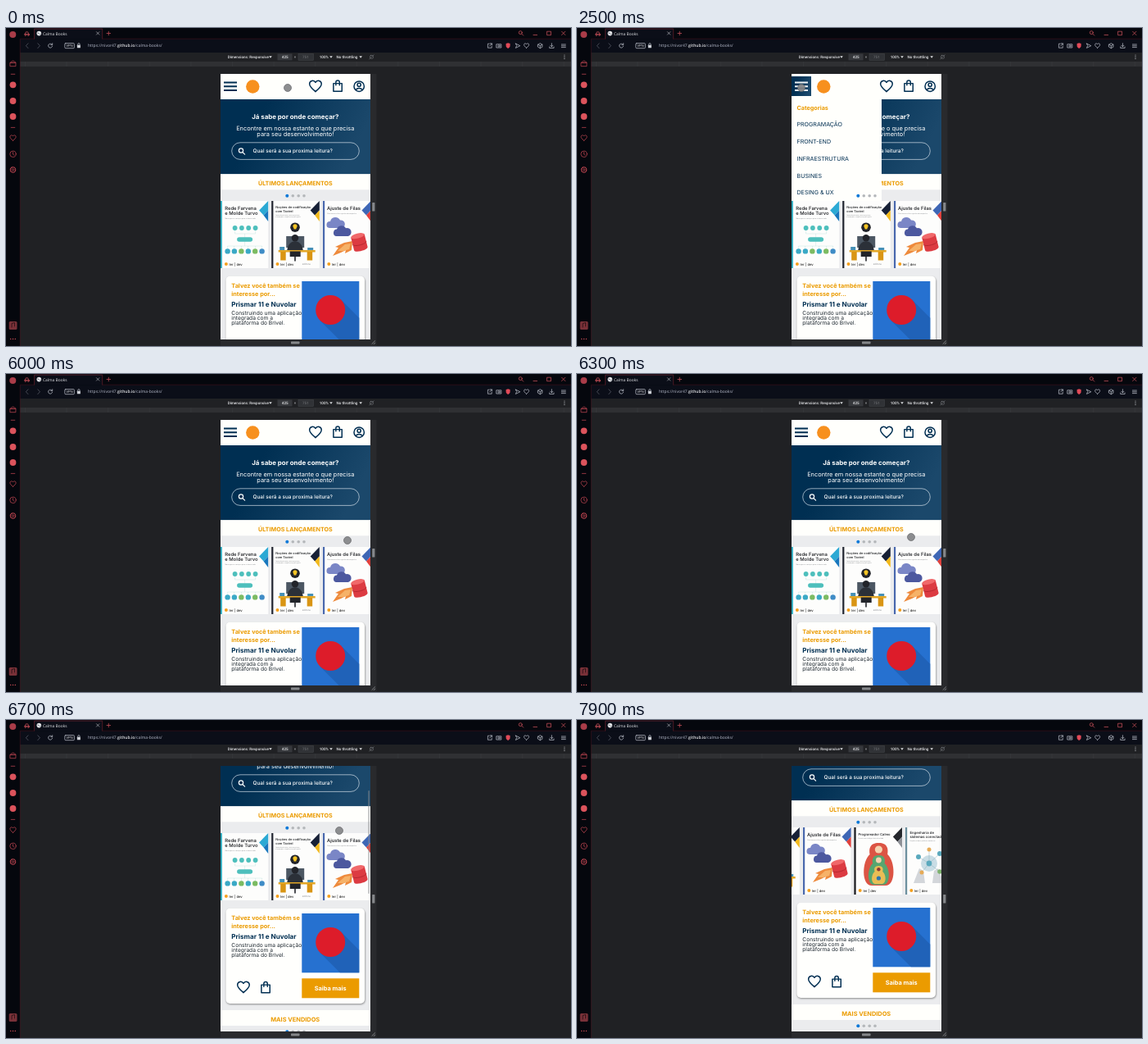
Recreate the animation shown at these times as an HTML page. Size 690 by 388 pixels, loop 8 s.

```html
<!DOCTYPE html>
<html lang="pt">
<head>
<meta charset="utf-8">
<title>Calma Books</title>
<style>
html, body { margin: 0; width: 100%; height: 100%; overflow: hidden; background: #202124; }
svg.stage { display: block; width: 100vw; height: 100vh; text-rendering: geometricPrecision; }
text { font-family: Inter, "Open Sans", sans-serif; white-space: pre; }
.ui text { font-family: "Open Sans", "Noto Sans", sans-serif; fill: #e4e5e8; }
.tools text { font: 500 4.6px Roboto, sans-serif; }
.line { fill: none; stroke: currentColor; stroke-linecap: round; stroke-linejoin: round; }
.mid { text-anchor: middle; }
.bold { font-weight: 700; }
.navy { fill: #002f52; }
.gold { fill: #eb9b00; }
.cover text { fill: #16181c; font-weight: 500; }
.cover .sub { fill: #8b8e92; font-size: 1.9px; font-weight: 400; }

.cursor, .scroll, .menu, .shelf, .bar { animation: 8s infinite step-end; }
.cursor { animation-name: cursor; }
.scroll { animation-name: scroll; }
.menu { animation-name: menu; }
.shelf { animation-name: shelf; }
.bar { animation-name: bar; }

@keyframes cursor {
  0% { transform: translate(344px, 73px); opacity: 1; }
  15% { transform: translate(344px, 73px); animation-timing-function: steps(6); }
  22.5% { transform: translate(274px, 73px); }
  57.5% { transform: translate(274px, 73px); animation-timing-function: steps(8); }
  67.5% { transform: translate(386px, 218px); animation-timing-function: steps(6); }
  75% { transform: translate(417px, 203px); animation-timing-function: steps(3); }
  78.75% { transform: translate(408px, 199px); }
  80% { transform: translate(407px, 177px); }
  81.25% { transform: translate(407px, 151px); }
  82.5% { transform: translate(407px, 135px); opacity: 1; }
  85%, 100% { transform: translate(407px, 135px); opacity: 0; }
}
@keyframes scroll {
  0%, 78.75% { transform: translateY(0); }
  80% { transform: translateY(-22px); }
  81.25% { transform: translateY(-48px); }
  82.5% { transform: translateY(-64px); }
  83.75% { transform: translateY(-73px); }
  85% { transform: translateY(-78px); }
  86.25%, 100% { transform: translateY(-80px); }
}
@keyframes bar {
  0% { opacity: 0; transform: translateY(0); }
  80% { opacity: .55; transform: translateY(9px); }
  81.25% { opacity: .55; transform: translateY(19px); }
  82.5% { opacity: .55; transform: translateY(26px); }
  83.75% { opacity: .55; transform: translateY(29px); }
  85% { opacity: .55; transform: translateY(32px); }
  92.5%, 100% { opacity: 0; transform: translateY(32px); }
}
@keyframes menu {
  0% { opacity: 0; }
  30% { opacity: 1; }
  57.5%, 100% { opacity: 0; }
}
@keyframes shelf {
  0%, 91.25% { transform: translateX(0); animation-timing-function: steps(2); }
  93.75% { transform: translateX(-28px); animation-timing-function: steps(2); }
  96.25% { transform: translateX(-83px); animation-timing-function: steps(2); }
  98.75%, 100% { transform: translateX(-111px); }
}
</style>
</head>
<body>
<svg class="stage" viewBox="0 0 690 388" xmlns="http://www.w3.org/2000/svg">
<defs>
  <linearGradient id="sea" x1="0" y1="0" x2="1" y2=".25">
    <stop offset=".3" stop-color="#002f52"/><stop offset="1" stop-color="#1b486b"/>
  </linearGradient>
  <clipPath id="screen"><rect x="262" y="56" width="183" height="324"/></clipPath>
  <filter id="soft" x="-10%" y="-10%" width="120%" height="120%"><feGaussianBlur stdDeviation="1.2"/></filter>
  <pattern id="ticks" width="50.6" height="6" patternUnits="userSpaceOnUse" x="17" y="41">
    <rect width="50.6" height="6" fill="#2f3033"/><path d="M6.5 0V6" stroke="#37393c" stroke-width=".6"/>
  </pattern>
  <path id="heart" d="M12 21C5 15 2 12 2 8a5.3 5.3 0 0 1 10-2.3A5.3 5.3 0 0 1 22 8c0 4-3 7-10 13z"/>
  <path id="bag" d="M5 8h14v13H5zM9 11V6a3 3 0 0 1 6 0v5"/>
  <g id="dots">
    <circle cx="343.3" r="2" fill="#0878d8"/>
    <g fill="#b4b7ba"><circle cx="350.3" r="1.8"/><circle cx="357.2" r="1.8"/><circle cx="364" r="1.8"/></g>
  </g>
  <g id="cover">
    <rect width="58.6" height="82" fill="#fdfdfc"/>
    <rect width="2.2" height="82" style="fill:var(--s)"/>
    <path d="M58.6 0L47.5 11.5L53 17.5L58.6 11.5z" style="fill:var(--a)"/>
    <path d="M58.6 11.5L53 17.5L58.6 25z" style="fill:var(--b)"/>
    <circle cx="7.3" cy="77" r="2" fill="#f5a01d"/>
    <text x="11" y="78.6" style="font-size:4.2px">ler | dev</text>
  </g>
</defs>

<rect width="690" height="388" fill="#202124"/>

<g class="ui">
  <rect width="690" height="14" fill="#05070d"/>
  <rect y="13" width="17" height="375" fill="#05070d"/>
  <rect x="17" y="13.5" width="673" height="16.5" fill="#0b0e18"/>
  <rect x="17" y="30" width="673" height="11" fill="#202124"/>
  <rect x="17" y="41" width="673" height="6" fill="url(#ticks)"/>
  <path d="M17.3 388V13.2H34.3M118 13.2H690" fill="none" stroke="#43141f" stroke-width=".6"/>
  <path d="M34.6 13.6V1.1H117.7V13.6" fill="#0b0e18" stroke="#7a2632" stroke-width=".6"/>

  <!-- side bar -->
  <g fill="#db535c">
    <circle cx="8.3" cy="8" r="4" fill="#a93c48"/>
    <circle cx="8.5" cy="69.3" r="3.9"/><circle cx="8.5" cy="89" r="3.9"/><circle cx="8.5" cy="108" r="3.9"/>
    <circle cx="5.7" cy="379.4" r=".7"/><circle cx="8.5" cy="379.4" r=".7"/><circle cx="11.3" cy="379.4" r=".7"/>
    <rect x="3.7" y="358" width="9.8" height="10" rx="1.5" fill="#793138"/>
  </g>
  <g class="line" color="#bd4550" stroke-width=".75">
    <path d="M5.3 42.5h6.6v4.2H5.3zM5.3 42.5l1-1.6M11.9 42.5l-1-1.6M7.2 42.5c0-3.6 2.8-3.6 2.8 0M6.2 56.3h4.6M6.2 121.4h4.6"/>
    <use href="#heart" transform="translate(4.2 129.8) scale(.36)" stroke-width="2.1"/>
    <circle cx="8.5" cy="153.8" r="3.7"/><path d="M8.5 151.7v2.4l1.5 1"/>
    <circle cx="8.5" cy="173" r="1.3"/><circle cx="8.5" cy="173" r="3.2" stroke-width="1.1" stroke-dasharray="1.5 1"/>
    <path d="M7 365v-4.5l3.5-1v4.4" stroke="#1c0c10"/>
  </g>

  <!-- tab strip -->
  <g class="line" color="#c9505a" stroke-width=".75">
    <path d="M22.5 7.5h6M23.3 7.5l.9-2.6h2.6l.9 2.6"/><circle cx="23.7" cy="8.6" r=".9"/><circle cx="27.3" cy="8.6" r=".9"/>
    <path d="M123 6.5h4.6M125.3 4.2v4.6"/>
    <circle cx="628.3" cy="5.6" r="2"/><path d="M629.8 7.1l2 2M644 8.5h4.6M661 4.2h4.5v4.5H661zM678.6 4.2l4.4 4.4M683 4.2l-4.4 4.4"/>
  </g>
  <circle cx="40.3" cy="6.6" r="2.8" fill="#e6e8eb"/>
  <path d="M38.4 5.4l1.7.5-.6 1.3zM41 7l1.2-.4-.6 1.7z" fill="#30343d"/>
  <text x="45" y="8.5" font-size="4.9">Calma Books</text>
  <path class="line" color="#c9ccd1" stroke-width=".6" d="M110.5 4.7l3.4 3.4M113.9 4.7l-3.4 3.4"/>

  <!-- address row -->
  <g class="line" color="#c3c7d2" stroke-width=".7">
    <path d="M27 18.8l-2.6 2.9 2.6 2.9M38.8 18.8l2.6 2.9-2.6 2.9" opacity=".45"/>
    <path d="M56.2 20.2a2.5 2.5 0 1 0 .4 2M56.7 18.7v1.9h-1.9"/>
    <rect x="71.8" y="18.6" width="11.6" height="6.1" rx="1"/>
    <path d="M87.7 20.8v-1a1.2 1.2 0 0 1 2.4 0v1"/>
    <path d="M590.2 19.2h-1.8v5h4.8v-1.8M590.6 22l2.7-3M591.3 18.9h2.1V21M599.2 19.8h5.6v4.2h-5.6z"/><circle cx="602" cy="21.9" r="1.2"/>
    <path d="M622.4 19l5.4 2.7-5.4 2.7 1.2-2.7zM649.7 20.2l2.6-1.5 2.6 1.5v3l-2.6 1.5-2.6-1.5zl2.6 1.5 2.6-1.5M652.3 21.7v3"/>
    <use href="#heart" transform="translate(632 18) scale(.3)" stroke-width="2.3"/>
    <path d="M666.4 18.7v4M664.8 21.2l1.6 1.6 1.6-1.6M663.7 23v1.4h5.4V23M678.4 20h5M678.4 21.8h5M678.4 23.6h5"/>
  </g>
  <path d="M610.6 19l2.5-.8 2.5.8v2.6c0 1.8-1 2.7-2.5 3.4-1.5-.7-2.5-1.6-2.5-3.4z" fill="#e24a58"/>
  <rect x="86.9" y="20.7" width="4" height="3.5" rx=".5" fill="#cfd2d8"/>
  <text class="mid" x="77.6" y="23.3" font-size="4.3">VPN</text>
  <text x="100" y="23.4" font-size="5"><tspan fill="#b9bece">https://nivor47.</tspan><tspan font-weight="600">github.io</tspan><tspan fill="#b9bece">/calma-books/</tspan></text>

  <!-- device tools -->
  <g class="tools">
    <text x="270.7" y="37">Dimensions: Responsive</text>
    <path d="M321.2 34.3h3.6l-1.8 2.4zM395.2 34.3h3.6l-1.8 2.4zM431.4 34.3h3.6l-1.8 2.4z" fill="#d8dadd"/>
    <rect x="331.5" y="31.4" width="18" height="8" fill="#36383c"/>
    <rect x="357" y="31.4" width="18.5" height="8" fill="#303236" stroke="#45484d" stroke-width=".5"/>
    <text x="336.8" y="37">425</text>
    <text x="351.8" y="37" opacity=".7">×</text>
    <text x="362" y="37" opacity=".3">751</text>
    <text x="382.7" y="37">100%</text>
    <text x="403.5" y="37">No throttling</text>
    <g class="line" color="#777b80" stroke-width=".6"><rect x="444.6" y="33.4" width="3.8" height="3.8" rx="1"/><path d="M443.8 37.8l5.4-5"/></g>
    <g fill="#b5b8bc"><circle cx="682" cy="33" r=".6"/><circle cx="682" cy="35.2" r=".6"/><circle cx="682" cy="37.4" r=".6"/></g>
  </g>
  <path d="M445 56h7.5v331.5H262V380H445z" fill="#292a2d"/>
  <rect x="447.2" y="213" width="3.2" height="10.5" rx=".6" fill="#85878a"/>
  <rect x="348" y="382.6" width="10.5" height="2.8" rx=".6" fill="#85878a"/>
  <path d="M446.7 385.7l4.2-4.2M449 385.9l2-2" stroke="#96989b" stroke-width=".8"/>
</g>

<g clip-path="url(#screen)">
 <g class="scroll">
  <rect x="262" y="56" width="183" height="440" fill="#ebecee"/>

  <!-- header -->
  <rect x="262" y="56" width="183" height="31" fill="#fffffc"/>
  <path d="M266 66.6h16M266 71.3h16M266 76h16" stroke="#002f52" stroke-width="2"/>
  <circle cx="301.3" cy="71.5" r="8.2" fill="#f7901e"/>
  <g class="line" color="#002f52" stroke-width="2">
    <use href="#heart" transform="translate(369.2 62.3) scale(.73)"/>
    <use href="#bag" transform="translate(396.2 61.7) scale(.74)"/>
    <g stroke-width="1.5"><circle cx="431.2" cy="71.2" r="6.2"/><circle cx="431.2" cy="69.3" r="2.1"/><path d="M427.2 75.6c1.6-2.8 6.4-2.8 8 0"/></g>
  </g>

  <!-- banner -->
  <rect x="262" y="87" width="183" height="91.3" fill="url(#sea)"/>
  <g fill="#fff" class="mid">
    <text class="bold" x="353.3" y="110.8" font-size="7.9">Já sabe por onde começar?</text>
    <text x="353.3" y="124.8" font-size="7.4">Encontre em nossa estante o que precisa</text>
    <text x="353.3" y="131.9" font-size="7.4">para seu desenvolvimento!</text>
  </g>
  <rect x="275.7" y="139.8" width="155.6" height="20.6" rx="10.3" fill="none" stroke="#d3dfe8" stroke-width=".7"/>
  <g class="line" color="#fff" stroke-width="1.2"><circle cx="287" cy="149.5" r="2.6"/><path d="M289 151.6l2.6 2.6"/></g>
  <text x="301.5" y="152.4" font-size="6.4" font-weight="500" fill="#fff">Qual será a sua proxima leitura?</text>

  <!-- new titles -->
  <rect x="262" y="178.3" width="183" height="19" fill="#fffffc"/>
  <text class="mid gold bold" x="353.4" y="192.2" font-size="7.2">ÚLTIMOS LANÇAMENTOS</text>

  <g class="menu">
    <rect x="262" y="87" width="110" height="124.5" fill="#fffffc"/>
    <rect x="262" y="59" width="24" height="24" fill="url(#sea)"/>
    <path d="M266 66.6h16M266 71.3h16M266 76h16" stroke="#eef1f3" stroke-width="2"/>
    <text class="gold bold" x="268.5" y="99.6" font-size="7.2">Categorias</text>
    <g class="navy" font-size="7.1">
      <text x="268.5" y="120.4">PROGRAMAÇÃO</text>
      <text x="268.5" y="141.1">FRONT-END</text>
      <text x="268.5" y="161.8">INFRAESTRUTURA</text>
      <text x="268.5" y="182.5">BUSINES</text>
      <text x="268.5" y="203.3">DESING &amp; UX</text>
    </g>
  </g>

  <use href="#dots" y="204.8"/>
  <g class="shelf cover">
    <g transform="translate(261.6 211)">
      <use href="#cover" style="--s:#25a9bd;--a:#2ba9d4;--b:#1877bd"/>
      <text x="5.6" y="10.5" font-size="5.9">Rede Farvena</text>
      <text x="5.6" y="17" font-size="5.9">e Molde Turvo</text>
      <text class="sub" x="5.8" y="21.6">Mensagens e serviços para sistemas web</text>
      <path d="M18 33v7h25v-7M30 40v15M9 61v-6h42v6M17 61v-6M26 61v-6M34 61v-6M43 61v-6" fill="none" stroke="#b5dddb" stroke-width=".4"/>
      <g fill="#4dbfbc"><circle cx="18" cy="33" r="2.9"/><circle cx="26.3" cy="33" r="2.9"/><circle cx="34.6" cy="33" r="2.9"/><circle cx="43" cy="33" r="2.9"/><rect x="20.5" y="44.2" width="19" height="5.6" rx="2.8"/></g>
      <g fill="#3aa9c6"><circle cx="9" cy="61.4" r="3.2"/><circle cx="17.3" cy="61.4" r="3.2"/><circle cx="34.2" cy="61.4" r="3.2"/></g>
      <g fill="#7bbb62"><circle cx="25.8" cy="61.4" r="3.2"/><circle cx="42.6" cy="61.4" r="3.2"/></g>
      <circle cx="51" cy="61.4" r="3.2" fill="#3f8cc6"/>
    </g>
    <g transform="translate(324.2 211)">
      <use href="#cover" style="--s:#20242f;--a:#172036;--b:#f2b91c"/>
      <text x="5" y="9.2" font-size="3.9">Noções de codificação</text>
      <text x="5" y="13.6" font-size="3.9">com Tavirel</text>
      <text class="sub" x="5" y="18">Aprenda do zero, com exercícios</text>
      <text class="sub" x="5" y="20.4">e exemplos simples em português</text>
      <circle cx="28.8" cy="32.2" r="5.8" fill="#22242a"/>
      <path d="M26.2 30.8a2.6 2.6 0 1 1 5.2 0c0 1.6-1.2 2-1.2 3.6h-2.8c0-1.6-1.2-2-1.2-3.6z" fill="#f5c525"/>
      <path d="M18 43h22v14H18z" fill="#4c5763"/>
      <circle cx="28.8" cy="45.2" r="4.2" fill="#22242a"/>
      <path d="M19 62c0-17 19.6-17 19.6 0z" fill="#2b3038"/>
      <path d="M8.5 60h45v2.4H8.5z" fill="#e3a727"/>
      <path d="M11 62h6.5v10.5H11zM43.5 62H50v10.5h-6.5z" fill="#d99514"/>
      <path d="M22.5 61.5h13v6.5h-13zM28 68h1.6v5.5H28z" fill="#22242a"/>
      <path d="M10 56h6v4h-6zM44 57h7v3h-7z" fill="#4690b6"/>
      <text class="sub" x="37.5" y="78.3" style="font-size:3px">editora</text>
    </g>
    <g transform="translate(387 211)">
      <use href="#cover" style="--s:#4a69ae;--a:#3e66b5;--b:#e0413c"/>
      <text x="5" y="11.4" font-size="5.9">Ajuste de Filas</text>
      <text class="sub" x="5" y="16.2">Otimize consultas e ganhe desempenho</text>
      <path d="M8 33a4 4 0 0 1 1-8 6.4 6.4 0 0 1 12-1.5 4.6 4.6 0 0 1 2 9.5z" fill="#7a86c6"/>
      <path d="M16 43a4.3 4.3 0 0 1 1-8.4 6 6 0 0 1 11-1.4 5 5 0 0 1 3 9.8z" fill="#4c589f"/>
      <path d="M12 67l7-10-4-1 11-5 10-2-1 11-8 4 1-4-6 3z" fill="#ee8a3c"/>
      <path d="M18 61l9-8 7-1-2 7-7 2z" fill="#f6b268"/>
      <g transform="rotate(-14 44 50)"><path d="M35.8 42.5h17v16c0 4-17 4-17 0z" fill="#dc3b42"/><ellipse cx="44.3" cy="42.5" rx="8.5" ry="3" fill="#f0686a"/><path d="M35.8 51c0 4 17 4 17 0" fill="none" stroke="#b0262f" stroke-width=".8"/></g>
    </g>
    <g transform="translate(449.4 211)">
      <use href="#cover" style="--s:#16181c;--a:#25272c;--b:#8d9096"/>
      <text x="5" y="9.7" font-size="4.1">Programador Calmo</text>
      <text class="sub" x="5" y="14.2">Escreva um código claro e testado</text>
      <g transform="translate(-6 0) scale(1.2 1)">
        <path d="M30 19c9 0 10 7 9 14 8 8 9 38-2 38H23c-11 0-10-30-2-38-1-7 0-14 9-14z" fill="#dc5444"/>
        <path d="M30 34c6 0 7 5 6 10 6 6 6 26-1 26H25c-7 0-7-20-1-26-1-5 0-10 6-10z" fill="#56a670"/>
        <path d="M30 47c4 0 5 3 4 7 4 4 4 15-1 15h-6c-5 0-5-11-1-15-1-4 0-7 4-7z" fill="#e9bd55"/>
      </g>
      <circle cx="30" cy="27" r="4.6" fill="#f5d3b0"/><circle cx="30" cy="40" r="3.4" fill="#f5d3b0"/><circle cx="30" cy="51.3" r="2.2" fill="#8c3a36"/>
      <circle cx="30" cy="62" r="2.6" fill="#2f76ad"/>
    </g>
    <g transform="translate(512 211)">
      <use href="#cover" style="--s:#6c8f9e;--a:#2f8ea8;--b:#e58b37"/>
      <text x="5.4" y="8" font-size="4.3">Engenharia de</text>
      <text x="5.4" y="12.6" font-size="4.3">sistemas conectados</text>
      <text class="sub" x="5.4" y="17">Projetos e boas práticas modernas</text>
      <path d="M10 68l7-18 5 3 2 15zM47 68l-7-18-5 3-2 15z" fill="#d3d6da"/>
      <circle cx="29" cy="44" r="10" fill="#c9dde5"/>
      <path d="M16 36l13 8 13-12M20 55l9-11 13 10M29 44V27" stroke="#8fb2bf" stroke-width=".5" fill="none"/>
      <g fill="#5aa9bd"><circle cx="16" cy="36" r="3"/><circle cx="42" cy="32" r="3"/><circle cx="29" cy="44" r="3.4"/></g>
      <g fill="#e6ab57"><circle cx="29" cy="27" r="2.5"/><circle cx="20" cy="55" r="2.5"/></g>
      <circle cx="42" cy="54" r="2.8" fill="#7eb36f"/>
    </g>
  </g>

  <!-- suggestion card -->
  <rect x="268.9" y="304" width="169.6" height="116" rx="5" fill="#000" opacity=".42" filter="url(#soft)"/>
  <rect x="268.5" y="302.7" width="169.5" height="116.3" rx="5" fill="#fffffd"/>
  <g class="bold gold" font-size="7.3"><text x="275.3" y="316.6">Talvez você também se</text><text x="275.3" y="326.7">interesse por...</text></g>
  <text class="bold navy" x="275.3" y="340" font-size="8.1">Prismar 11 e Nuvolar</text>
  <g fill="#1d2730" font-size="6.65"><text x="275.3" y="350.2">Construindo uma aplicação</text><text x="275.3" y="356">integrada com a</text><text x="275.3" y="361.9">plataforma do Brivel.</text></g>
  <rect x="361.3" y="309" width="70" height="72.3" fill="#2671d0"/>
  <path d="M408.9 331.3L431.3 353.7V381.3H407.9L383.3 356.7z" fill="#2062b8"/>
  <circle cx="396.2" cy="344" r="18" fill="#dd1c2a"/>
  <g class="line" color="#002f52" stroke-width="2">
    <use href="#heart" transform="translate(281.2 390.3) scale(.73)"/>
    <use href="#bag" transform="translate(308.2 390.2) scale(.74)"/>
  </g>
  <rect x="361.3" y="388.3" width="70" height="24" fill="#eb9b00"/>
  <text class="mid bold" x="396.2" y="402.8" font-size="7.4" fill="#fff">Saiba mais</text>

  <rect x="262" y="427" width="183" height="19" fill="#fffffc"/>
  <text class="mid gold bold" x="353.2" y="440.8" font-size="7.4">MAIS VENDIDOS</text>
  <use href="#dots" y="453.3"/>
 </g>
 <rect class="bar" x="442.3" y="57" width="1.7" height="126" rx=".8" fill="#8a8d91"/>
</g>

<circle class="cursor" r="4.5" fill="#838487" fill-opacity=".92" stroke="#66686b" stroke-width=".7"/>
</svg>
</body>
</html>
```
